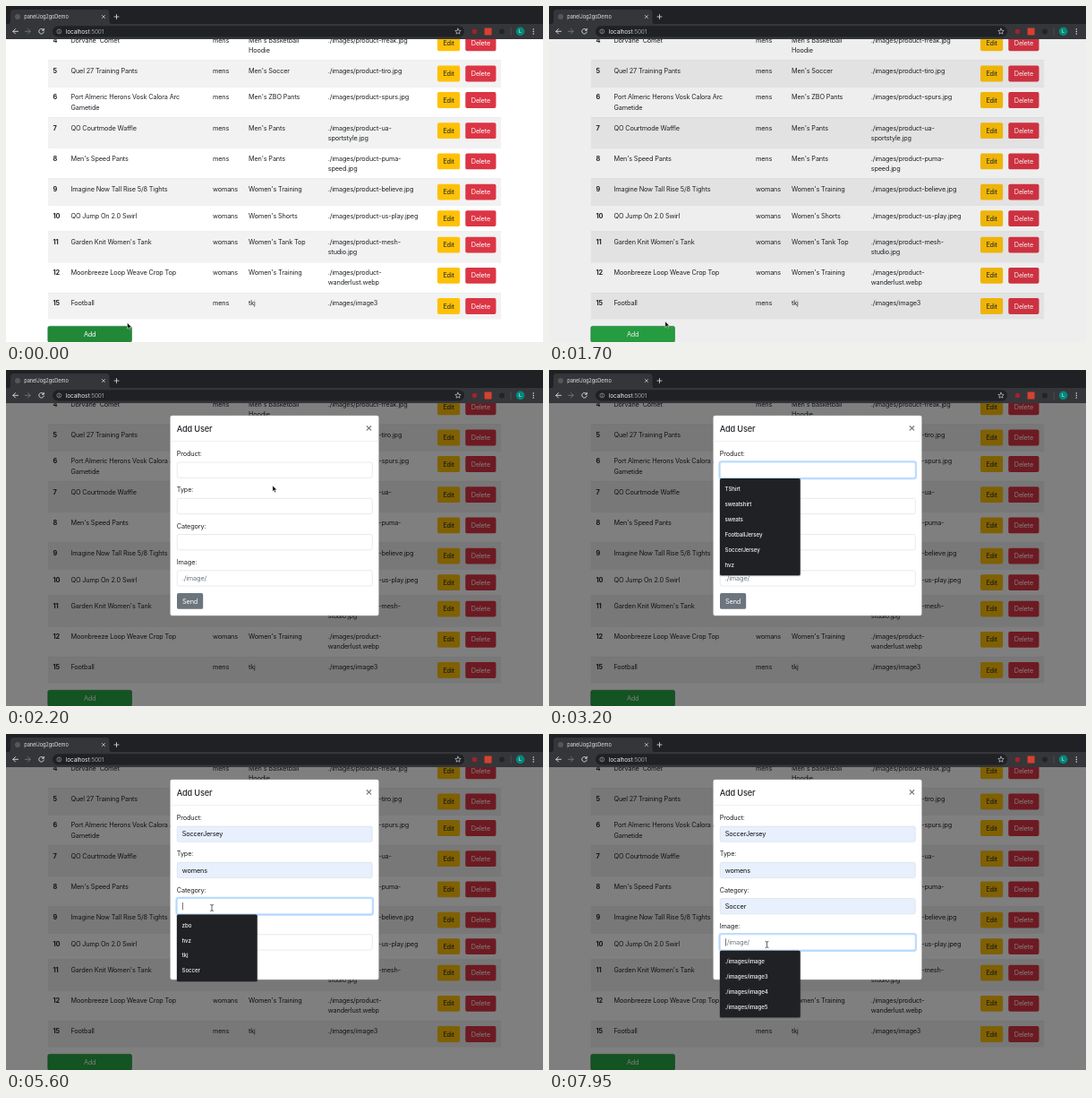
Recreate the animation shown at these times as an HTML page. Size 600x375 px, loop 8 s.

```html
<!DOCTYPE html>
<html lang="en">
<head>
<meta charset="utf-8">
<title>Product admin</title>
<style>
html, body { margin: 0; width: 100%; height: 100%; overflow: hidden; background: #fff; }
svg { display: block; width: 100%; height: 100%; }
text { font: 7.3px Inter, Roboto, sans-serif; letter-spacing: -.02em; white-space: pre; }
</style>
</head>
<body>
<svg id="stage" viewBox="0 0 600 375"></svg>
<script>
const LOOP = 8000, STEP = 50;
const INK = '#212529', DARK = '#202124', BAR = '#35363a', PALE = '#dfe1e5';
const stage = document.getElementById('stage');

function add(parent, tag, attrs = {}, content) {
  const el = document.createElementNS('http://www.w3.org/2000/svg', tag);
  set(el, attrs);
  if (content !== undefined) el.textContent = content;
  parent.appendChild(el);
  return el;
}
function set(el, attrs) {
  for (const k in attrs) el.setAttribute(k, attrs[k]);
}
const group = parent => add(parent, 'g');
const show = (el, on) => set(el, { visibility: on ? 'visible' : 'hidden' });
const rect = (p, x, y, width, height, fill, more) =>
  add(p, 'rect', { x, y, width, height, fill, ...more });
const line = (p, d, stroke, width = 1) =>
  add(p, 'path', { d, stroke, 'stroke-width': width, fill: 'none', 'stroke-linecap': 'round', 'stroke-linejoin': 'round' });
// Text is placed by the vertical middle of its capitals.
function label(p, x, mid, str, { size = 7.3, fill = INK, weight = 400, anchor = 'start' } = {}) {
  return add(p, 'text', { x, y: mid + size * .363, fill, 'text-anchor': anchor,
    style: `font-size:${size}px;font-weight:${weight}` }, str);
}
function button(p, x, y, w, str, fill, color) {
  const box = rect(p, x, y, w, 17.8, fill, { rx: 1.9 });
  label(p, x + w / 2, y + 8.9, str, { fill: color, anchor: 'middle' });
  return box;
}

// Table: number, name, type, category, image; "|" breaks a line.
const rows = [
  [4, "Dorvane 'Comet", 'mens', "Men's Basketball|Hoodie", './images/product-freak.jpg'],
  [5, 'Quel 27 Training Pants', 'mens', "Men's Soccer", './images/product-tiro.jpg'],
  [6, 'Port Almeric Herons Vosk Calora Arc|Gametide', 'mens', "Men's ZBO Pants", './images/product-spurs.jpg'],
  [7, 'QO Courtmode Waffle', 'mens', "Men's Pants", './images/product-ua-|sportstyle.jpg'],
  [8, "Men's Speed Pants", 'mens', "Men's Pants", './images/product-puma-|speed.jpg'],
  [9, 'Imagine Now Tall Rise 5/8 Tights', 'womans', "Women's Training", './images/product-believe.jpg'],
  [10, 'QO Jump On 2.0 Swirl', 'womans', "Women's Shorts", './images/product-us-play.jpeg'],
  [11, "Garden Knit Women's Tank", 'womans', "Women's Tank Top", './images/product-mesh-|studio.jpg'],
  [12, 'Moonbreeze Loop Weave Crop Top', 'womans', "Women's Training", './images/product-|wanderlust.webp'],
  [15, 'Football', 'mens', 'tkj', './images/image3']
];
const columns = [52.5, 72.5, 231, 271, 359.7];
const LINE = 11.25;

function drawTable(p) {
  let y = 26.3;
  rows.forEach((row, i) => {
    const tall = row.some(c => String(c).includes('|'));
    const h = tall ? 34.2 : 29.5;
    rect(p, 46.8, y, 506.4, h, i % 2 ? '#f2f2f2' : '#fff');
    rect(p, 46.8, y, 506.4, .5, '#dee2e6');
    row.forEach((cell, c) => String(cell).split('|').forEach((str, n) =>
      label(p, columns[c], y + 11.8 + n * LINE, str, { weight: c ? 400 : 700 })));
    button(p, 482, y + 6.1, 25.2, 'Edit', '#ffc107', INK);
    button(p, 513.3, y + 6.1, 34.2, 'Delete', '#dc3545', '#fff');
    y += h;
  });
}

const page = group(stage);
rect(page, 0, 0, 600, 375, '#fff');
drawTable(page);
const addButton = button(page, 46.8, 357.4, 93.7, 'Add', '#28a745', '#fff');
set(addButton, { stroke: '#1e7e34', 'stroke-width': .6 });
const shade = rect(stage, 0, 37, 600, 338, '#000');

// Form fields with the times they are focused, opened and filled.
const NEVER = 1e9;
const fields = [
  { name: 'Product:', focus: 2550, open: 2900, pick: 3950, value: 'SoccerJersey',
    options: ['TShirt', 'sweatshirt', 'sweats', 'FootballJersey', 'SoccerJersey', 'hvz'] },
  { name: 'Type:', focus: 4450, open: 4450, pick: 5250, value: 'womens', options: ['mens', 'womens'] },
  { name: 'Category:', focus: 5600, open: 5600, pick: 7000, value: 'Soccer',
    options: ['zbo', 'hvz', 'tkj', 'Soccer'] },
  { name: 'Image:', focus: 7550, open: 7550, pick: NEVER, hint: './image/',
    options: ['./images/image', './images/image3', './images/image4', './images/image5'] }
];
const INPUT = { x: 191, w: 218.5, h: 17.8 }, ITEM = 16.85, POP_W = 89.7;

const modal = group(stage);
rect(modal, 183.4, 50.8, 233.2, 223.4, '#fff', { rx: 2.2, stroke: '#000', 'stroke-opacity': .2, 'stroke-width': .5 });
label(modal, 190.8, 65.2, 'Add User', { size: 9.2, weight: 500 });
line(modal, 'M403.3 62.7l4.4 4.4m0-4.4l-4.4 4.4', '#7f7f7f', 1.3);
rect(modal, 183.4, 79.2, 233.2, .5, '#dee2e6');
button(modal, 191, 249, 29.2, 'Send', '#6c757d', '#fff');

fields.forEach((f, i) => {
  f.y = 102.8 + i * 40.25;
  f.end = i < 3 ? fields[i + 1].focus : NEVER;
  const mid = f.y + INPUT.h / 2;
  label(modal, 190.8, f.y - 9.2, f.name);
  f.glow = rect(modal, INPUT.x - .8, f.y - .8, INPUT.w + 1.6, INPUT.h + 1.6, 'none',
    { rx: 2.6, stroke: '#007bff', 'stroke-opacity': .27, 'stroke-width': 1.6 });
  f.box = rect(modal, INPUT.x + .25, f.y + .25, INPUT.w - .5, INPUT.h - .5, '#fff', { rx: 1.9, 'stroke-width': .5 });
  f.text = label(modal, 196.8, mid, f.value || f.hint, { fill: f.hint ? '#6c757d' : '#111' });
  f.peek = label(modal, 196.8, mid, '', { size: 5.8, fill: '#111' });
  f.caret = rect(modal, 197, mid - 4.2, .6, 8.4, '#222');
});

// Suggestion lists lie above every field.
fields.forEach(f => {
  f.list = group(modal);
  f.top = f.y + INPUT.h + .5;
  f.first = f.top + 3.5;
  const h = f.options.length * ITEM + 7;
  rect(f.list, INPUT.x - .6, f.top, POP_W + 1.2, h + 1, '#000', { rx: 1.8, opacity: .25 });
  rect(f.list, INPUT.x, f.top, POP_W, h, DARK, { rx: 1.6 });
  f.mark = rect(f.list, INPUT.x, f.first, POP_W, ITEM, '#3c3d40');
  f.options.forEach((str, n) =>
    label(f.list, 196.6, f.first + (n + .5) * ITEM, str, { size: 6.2, weight: 500, fill: '#f1f1f1' }));
});

function drawBrowser(p) {
  rect(p, 0, 0, 600, 21, DARK);
  add(p, 'path', { d: 'M2 20.5Q5 20 5 17V7.500Q5 4 8.500 4H112Q115.500 4 115.500 7.500V17Q115.500 20 118.500 20.500Z', fill: BAR });
  rect(p, 0, 20, 600, 17, BAR);
  add(p, 'circle', { cx: 13, cy: 12, r: 3, fill: '#55575b' });
  label(p, 20.3, 12, 'panelJog2goDemo', { size: 5.7, fill: PALE });
  line(p, 'M107.300 10.400l3.200 3.200m0-3.200l-3.200 3.200', PALE, .7);
  line(p, 'M121 12h5m-2.500-2.500v5', PALE, .8);
  line(p, 'M13.500 28.300H8m2.500-2.700L7.800 28.300l2.700 2.700', PALE, .9);
  line(p, 'M21.500 28.300H27m-2.500-2.700l2.700 2.700l-2.700 2.700', '#77797d', .9);
  line(p, 'M41.800 26.500A2.800 2.800 0 1 0 42.300 29M42.300 25.300v1.900h-1.900', PALE, .9);
  rect(p, 52, 22.2, 460, 12.4, DARK, { rx: 6.2 });
  add(p, 'circle', { cx: 59.3, cy: 28.4, r: 2.4, fill: 'none', stroke: '#b5b8bd', 'stroke-width': .6 });
  line(p, 'M59.300 28.200v1.300m0-2.500v.01', '#b5b8bd', .6);
  const url = label(p, 66.8, 28.4, 'localhost', { size: 6.5, fill: '#e8eaed' });
  add(url, 'tspan', { fill: '#9aa0a6' }, ':5001');
  line(p, 'M505 25.200l.900 2.100l2.300.200l-1.700 1.500l.500 2.200l-2-1.200l-2 1.200l.500-2.200l-1.700-1.500l2.300-.200z', PALE, .6);
  add(p, 'circle', { cx: 523.5, cy: 28.4, r: 2.7, fill: '#a3222b' });
  rect(p, 534.6, 24.4, 8, 8, '#d9402f', { rx: .6 });
  add(p, 'circle', { cx: 554, cy: 28.4, r: 3, fill: '#232428' });
  rect(p, 563.8, 24, .5, 9, '#5f6368');
  add(p, 'circle', { cx: 574.6, cy: 28.4, r: 4.8, fill: '#00897b' });
  label(p, 574.6, 28.4, 'L', { size: 5.4, fill: '#fff', anchor: 'middle' });
  [25.9, 28.4, 30.9].forEach(cy => add(p, 'circle', { cx: 589.3, cy, r: .75, fill: PALE }));
}
drawBrowser(group(stage));

const pointer = group(stage);
const arrow = add(pointer, 'path', { d: 'M0 0V6.600L1.500 5.200L2.600 7.700L3.700 7.200L2.600 4.800H4.700Z',
  fill: '#000', stroke: '#fff', 'stroke-width': .5, 'stroke-linejoin': 'round' });
const beam = line(pointer, 'M-1.400-3.600Q0-3.600 0-2.600V2.600Q0 3.600-1.400 3.600M1.400-3.600Q0-3.600 0-2.600M0 2.600Q0 3.600 1.400 3.600', '#222', .7);

// Pointer stops: time, x, y
const stops = [
  [0, 135.5, 353.5], [350, 130, 361], [1600, 128, 360], [1700, 129.8, 352], [1900, 308, 194],
  [2150, 300, 130], [2500, 262, 112], [3300, 240, 113], [3750, 226, 200], [4000, 226, 200],
  [4400, 232.7, 158.5], [4700, 232.7, 158.5], [5050, 224, 190], [5300, 224, 190],
  [5550, 230, 194], [5700, 230, 194], [6250, 225.3, 249], [6650, 225.3, 249], [6850, 224, 263],
  [7050, 224, 263], [7450, 243.5, 235], [LOOP, 243.5, 235]
];
function pointerAt(t) {
  const i = stops.findIndex(s => s[0] > t);
  const [t0, x0, y0] = stops[i - 1], [t1, x1, y1] = stops[i];
  const u = (t - t0) / (t1 - t0), e = u * u * (3 - 2 * u);
  return [x0 + (x1 - x0) * e, y0 + (y1 - y0) * e];
}

const ramp = (t, start, span) => Math.min(1, Math.max(0, (t - start) / span));
const SHADE_AT = 1680, MODAL_AT = 1865;

function render(t) {
  const [px, py] = pointerAt(t);
  set(addButton, { fill: t < 1650 ? '#218838' : '#28a745' });
  set(shade, { opacity: .5 * ramp(t, SHADE_AT, 150) });

  const slide = 1 - (1 - ramp(t, MODAL_AT, 300)) ** 1.7;
  set(modal, { opacity: ramp(t, MODAL_AT, 150), transform: `translate(0 ${-23.4 * (1 - slide)})` });

  let overList = false, overInput = false;
  for (const f of fields) {
    const focused = t >= f.focus && t < f.end;
    const open = t >= f.open && t < f.pick;
    const filled = t >= f.pick;
    const n = Math.floor((py - f.first) / ITEM);
    const hover = open && px > INPUT.x && px < INPUT.x + POP_W && n >= 0 && n < f.options.length;
    overList = overList || hover;
    overInput = overInput || (px > INPUT.x && px < INPUT.x + INPUT.w && py > f.y && py < f.y + INPUT.h);

    show(f.glow, focused);
    set(f.box, { stroke: focused ? '#80bdff' : '#ced4da', fill: filled || hover ? '#e8f0fe' : '#fff' });
    show(f.text, filled || (f.hint && !hover));
    show(f.peek, hover);
    if (hover) {
      f.peek.textContent = f.options[n];
      set(f.mark, { y: f.first + n * ITEM });
    }
    show(f.list, open);
    show(f.mark, hover);
    show(f.caret, focused && (t - f.focus) % 1000 < 500);
    set(f.caret, { x: filled ? 197.2 + f.text.getComputedTextLength() : 197 });
  }

  const isBeam = t > 2165 && overInput && !overList;
  set(pointer, { transform: `translate(${px} ${py})` });
  const seen = t < 2900 || t >= 3300;
  show(arrow, seen && !isBeam);
  show(beam, seen && isBeam);
}

const start = performance.now();
function tick() {
  const t = (performance.now() - start) % LOOP;
  render(Math.floor(t / STEP) * STEP);
  requestAnimationFrame(tick);
}
tick();
</script>
</body>
</html>
```
